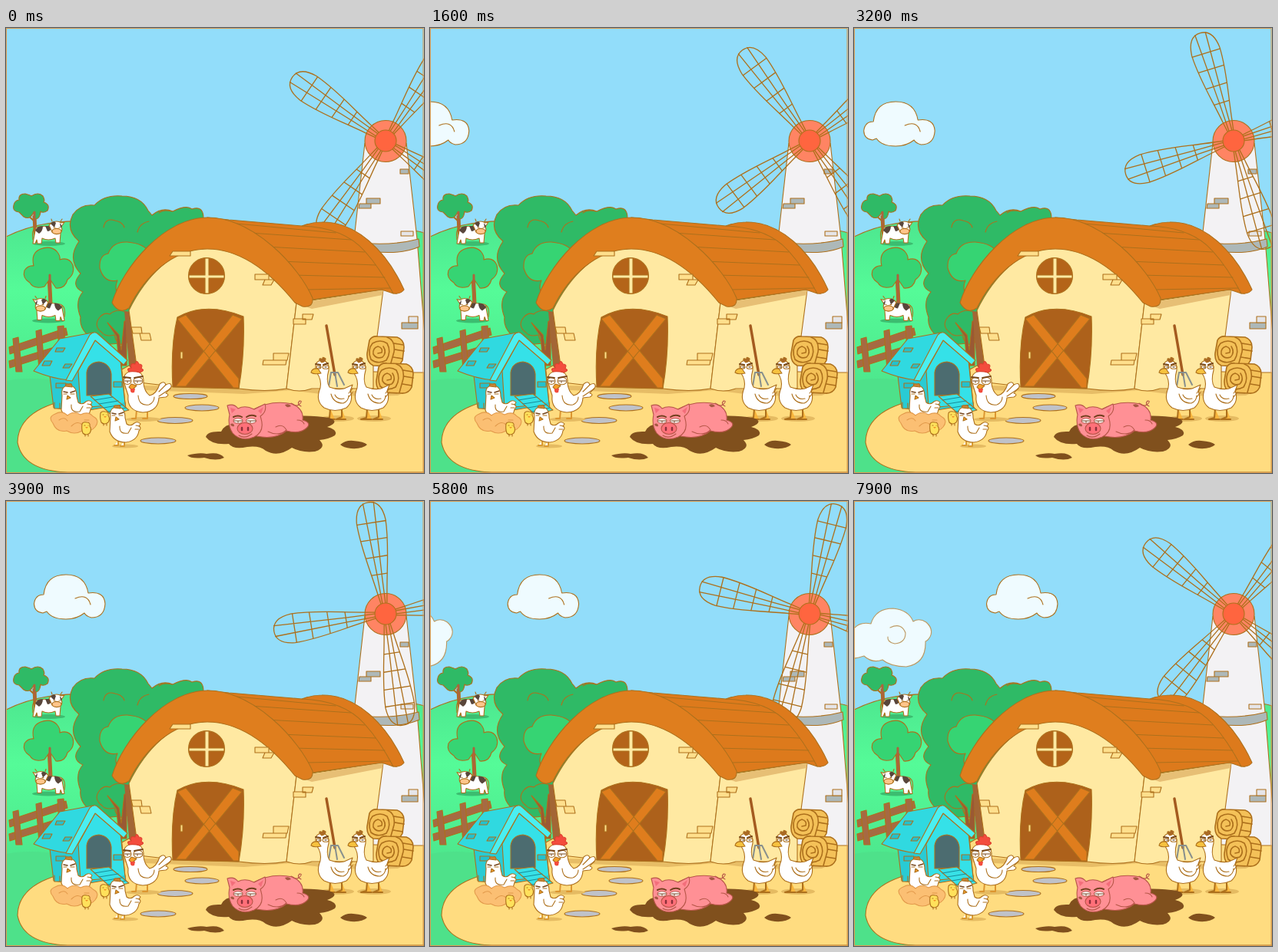
An HTML page that plays this animation: 544x580 px, repeating every 8000 ms.

```html
<!DOCTYPE html>
<html lang="en">
<head>
<meta charset="utf-8">
<title>Farm</title>
<style>
html, body { margin: 0; width: 100%; height: 100%; overflow: hidden; background: #92ddfa; }
svg { display: block; width: 544px; height: 580px; }
.ink { stroke: #ad701c; stroke-width: 1.1; stroke-linejoin: round; stroke-linecap: round; }
.line { fill: none; }
.flat { stroke: none; }
</style>
</head>
<body>
<svg viewBox="0 0 544 580">
<defs>
  <linearGradient id="grass" x1="0" y1="250" x2="0" y2="560" gradientUnits="userSpaceOnUse">
    <stop offset="0" stop-color="#4de68f"/><stop offset=".3" stop-color="#55fb98"/><stop offset=".8" stop-color="#4be28a"/>
  </linearGradient>
  <g id="blade" fill="none" stroke-width="1.3">
    <path d="M14 -4L26 -6C60 -11 90 -19 122 -19Q147 -17 147 0Q147 17 122 19C90 19 60 11 26 6L14 4"/>
    <path d="M14 -2L50 -3L146 -7M14 2L50 3L146 7M52 -10V10M75 -14V14M98 -17V17M120 -19V19"/>
  </g>
  <g id="cow" fill="#fff">
    <ellipse cx="56" cy="281" rx="21" ry="3" fill="#3cbd70" class="flat"/>
    <path d="M38 261Q33 264 35 276" class="line"/>
    <path d="M39 260Q52 256 66 261L71 268L70 280H65L64 274Q55 278 47 274L46 281H41L40 276L38 281H35Q37 268 39 260Z"/>
    <path d="M38 264Q40 258 48 258Q48 265 43 268ZM51 258H58Q60 265 54 265Z" fill="#59463b" class="flat"/>
    <path d="M59 254Q66 250 72 254L76 253L72 259Q74 264 71 267Q65 270 60 266Q58 261 56 257Z"/>
    <path d="M58 255Q62 250 65 254L63 260ZM70 254L73 258L71 261Z" fill="#59463b" class="flat"/>
    <ellipse cx="66" cy="265" rx="6" ry="3.600" fill="#ffc58a"/>
    <path d="M62 260H64M69 260H70M60 252L59 249M71 252L73 249" class="line"/>
  </g>
  <g id="goose" fill="#fff">
    <ellipse cx="431" cy="509" rx="22" ry="4" fill="#e5bb62" class="flat"/>
    <path d="M422 496L421 508L414 510H428M437 496V507L430 510H442" fill="#f8b53d" stroke-width="2"/>
    <path d="M403 443Q402 434 411 433Q421 434 420 446Q416 460 421 468Q431 472 440 470L451 465L448 473Q453 486 443 495Q428 502 414 495Q402 486 409 469Q411 459 405 450Z"/>
    <path d="M451 470L446 476M451 475L446 481M423 477Q426 489 439 489Q446 486 446 479M428 478Q431 485 440 483" class="line"/>
    <path d="M406 444Q398 443 397 449Q401 452 410 450Z" fill="#f6c23f"/>
    <path d="M408 433Q407 429 412 432Q411 427 416 431Q416 435 411 436Z" fill="#a96827"/>
    <path d="M403 438L409 439M413 439L419 437" stroke="#764514" stroke-width="2"/>
    <ellipse cx="407" cy="442" rx="3" ry="2"/><ellipse cx="416" cy="442" rx="4" ry="2.300"/>
    <path d="M407 442H409M415 442H417" stroke="#513314"/>
  </g>
  <g id="hen" fill="#fff">
    <path d="M146 538V544H141M154 538V545H149" stroke="#d99a31" stroke-width="2"/>
    <path d="M136 507Q134 494 145 494Q155 494 155 508L157 516Q162 520 167 515Q172 512 175 516L173 519Q177 521 173 525Q171 538 156 540Q140 540 135 526Z"/>
    <path d="M141 495Q139 491 145 492Q149 490 149 496Z" fill="#c78338"/>
    <path d="M138 502L143 503M147 503L153 501" stroke="#75451b" stroke-width="1.500"/>
    <path d="M138 505H142M147 505H152M148 519Q147 530 159 528L163 521M169 518L174 519M168 523H173" class="line"/>
    <path d="M143 507L147 510L142 512Z" fill="#f5a02d"/>
  </g>
  <g id="chick">
    <path d="M99 516Q100 513 105 514Q110 514 109 519Q112 523 109 528Q104 532 100 528Q98 523 99 516Z" fill="#ffe15b"/>
    <path d="M102 518H103M107 518H107M103 530V532M107 530V532" class="line"/><path d="M103 520H107L105 522Z" fill="#f08f25" class="flat"/>
  </g>
  <g id="bale" stroke-width="1.600">
    <path d="M485 442Q488 436 496 437L521 438Q530 441 530 451L528 468Q524 477 514 476L490 475Q481 471 482 459Z" fill="#f4c158"/>
    <path d="M508 438Q519 442 517 457L512 475M517 446L529 448M518 454L530 456M516 464L528 466" class="line"/>
    <path class="line" d="M508 446Q514 457 507 468Q496 474 487 467Q482 454 489 446Q499 440 508 446M503 450Q508 458 502 464Q494 467 490 460Q489 452 496 450Q503 452 501 458L496 459"/>
  </g>
</defs>

<g class="ink">
  <path class="flat" d="M0 0H544V580H0Z" fill="#92ddfa"/>
  <g id="cloudA" fill="#effbff">
    <path d="M48 146Q37 145 36.500 134Q38 122 49 122Q52 96 78 96Q103 96 107 120Q128 117 129 134Q128 152 111 152Q104 150 102 146Q92 154 78 154Q60 154 53 144Z"/>
    <path class="line" d="M90 127Q106 120 110 135"/>
  </g>
  <g id="cloudB" fill="#effbff" stroke="#bd9860">
    <path d="M22 160Q28 140 51 140Q71 142 77 157Q85 152 94 158Q104 167 99 177Q96 182 93 183Q94 212 68 216Q48 216 37 207Q24 212 13 202Q-14 211 -26 197Q-36 184 -23 173Q-14 162 0 166Q8 157 22 160Z"/>
    <path class="line" d="M47 165Q62 158 67 172Q67 185 53 186Q43 184 44 177"/>
  </g>

  <path d="M0 272Q45 250 100 252Q280 260 380 300L470 276Q520 258 544 267V580H0Z" fill="url(#grass)"/>
  <path d="M0 460Q28 454 70 460V580H0Z" fill="#4ee18a" class="flat"/>

  <path d="M467 150L453 275L440 450H546L545 400L535 275L521 150Z" fill="#f3f2f4"/>
  <g fill="#adb8b8">
    <path d="M452 279Q499 285 537 275L538 285Q514 296 475 291L452 288Z"/>
    <path d="M469 222H487V229H469ZM460 229H475V235H459ZM513 184H524V190H513ZM515 384H536V392H515Z"/>
    <path fill="#e5e5e8" d="M514 265H530V271H514ZM524 376H536V384H524Z"/>
  </g>
  <circle cx="494" cy="147.500" r="27" fill="#ff8463"/>
  <g id="sails"></g>
  <circle cx="494" cy="147" r="14" fill="#ff653f"/>

  <g fill="#ad633d">
    <path d="M35 245L37 280H40L39 246ZM54 320L56 360H60L58 320Z"/>
    <path d="M37 252L26 242M38 247L47 237M57 333L45 322M58 328L68 319" class="line" stroke-width="2"/>
  </g>
  <path fill="#2fba66" d="M17 240Q8 239 10 231Q11 225 17 224Q16 216 25 216Q32 218 33 219Q42 213 48 219Q51 224 49 227Q58 230 54 238Q48 242 45 239Q44 250 37 249L36 240Q31 251 23 246Z"/>
  <path fill="#36d473" d="M31 332Q21 326 24 316Q29 309 36 310Q32 293 45 288Q58 283 66 291Q71 297 70 302Q82 298 87 309Q90 321 80 328Q77 340 65 339L57 327L50 337Q36 341 31 332Z"/>
  <path d="M37 240V252M57 322V338" class="line" stroke-width="3" stroke="#ad633d"/>
  <use href="#cow"/>
  <use href="#cow" transform="matrix(-1 0 0 1 111 100.500)"/>

  <path d="M126 413Q94 398 97 377Q89 356 100 344Q83 336 97 320Q79 301 95 278Q77 263 87 243Q97 229 115 231Q128 217 151 219Q176 219 185 238L190 244Q203 233 217 239Q235 230 242 236Q257 231 257 248L230 310L158 410Z" fill="#2fba66"/>
  <path d="M127 260Q129 247 142 251Q152 253 154 260M171 266Q174 254 186 252M199 241Q205 236 216 239" class="line"/>
  <path d="M122 313Q121 296 133 294Q139 278 158 279Q181 281 186 293L178 325L151 355Q139 343 145 329Q128 333 122 313Z" fill="#36d473"/>
  <path d="M125 397Q113 388 122 377Q128 370 135 373Q145 364 160 372L158 409Q146 419 141 400Q130 403 125 397Z" fill="#2fba66"/>
  <path d="M132 384L147 400L150 420L154 382H157V440H147L144 402Z" fill="#9a5934"/>

  <g fill="#a66a42">
    <path d="M4 416L78 391L80 400L5 425ZM4 434L76 412L77 420L5 443Z"/>
    <path d="M9 405L16 403L21 448H13ZM39 395L46 393L50 445H43ZM67 389L75 388L79 435H70Z"/>
  </g>

  <path d="M75 486Q16 500 15 540Q22 577 80 579H544V449H520L160 440Z" fill="#ffdc80"/>
  <path class="flat" d="M147 452L177 466L365 470L491 474L520 474L510 479Q430 482 372 472L310 477L155 471Z" fill="#e7bd66"/>

  <path class="flat" d="M154 369L163 370L174 462L160 440Z" fill="#a36635"/>
  <path d="M160 368C181 325 217 286 261 286C310 287 351 325 378 358L365 470Q339 475 303 470L216 467L173 462Z" fill="#ffe9a2"/>
  <path d="M378 358L491 341L478 440V470H398Q382 476 365 470Z" fill="#ffe9a2"/>
  <path class="flat" d="M378 359L491 341L490 348L398 366Z" fill="#e7bf75"/>
  <path d="M262 247L290 250L385 258Q398 253 411 253C455 252 495 290 518 341Q514 347 504 346L489 341L399 354Z" fill="#dd7a1c"/>
  <path d="M385 258Q440 260 467 291Q486 312 504 346" class="line"/>
  <path d="M300 255L429 267M317 267L449 276M338 285L467 292M356 304L481 309M373 322L493 325M390 341L500 339" class="line"/>
  <path d="M138 358C152 312 206 247 262 247C323 247 382 312 399 352Q400 365 386 363L376 358C347 322 308 288 262 288C218 288 181 322 160 365Q147 374 138 358Z" fill="#df7e1e"/>
  <path fill="#ffdf8c" d="M217 291H240V297H213ZM324 321H342V328H324ZM337 328H349L345 335H334ZM163 390H176L177 398H165ZM174 398H187L189 407H176ZM348 424H368L366 433H348ZM335 433H365L364 439H334ZM386 373H400L398 380H386ZM374 379H390V386H374Z"/>
  <circle cx="261" cy="323" r="23.500" fill="#b46419"/>
  <path d="M259 300H264V322H284V326H264V346H259V326H238V322H259Z" fill="#ffe9a2"/>

  <path d="M217 468Q214 414 223 377Q260 356 309 376Q311 424 303 470Z" fill="#ad611b"/>
  <path d="M295 374L307 379L234 467H221ZM223 379L234 374L303 457V469H296Z" fill="#df7d1d"/>
  <path d="M227 422H230V431H227Z" fill="#ffdf8c"/>

  <path d="M417 388L428 452" class="line" stroke-width="3.500" stroke="#a45b20"/>
  <path d="M420 467L423 449H432L440 465M428 449L431 467" class="line" stroke="#88908d" stroke-width="2"/>
  <use href="#bale" transform="translate(-12 -35)"/>
  <use href="#bale"/>

  <g fill="#bfc2c9">
    <ellipse cx="240" cy="480" rx="22" ry="3.500"/><ellipse cx="255" cy="495" rx="22" ry="4"/>
    <ellipse cx="220" cy="511.500" rx="23" ry="4"/><ellipse cx="198" cy="538" rx="23" ry="4"/>
  </g>

  <path d="M57 453L96 447L150 437L155 490L97 500L62 495Z" fill="#29cbd4"/>
  <path d="M94 447L116 407L149 434L155 490L97 495Z" fill="#35e1e8"/>
  <path d="M63 488V496H70V489M149 489L151 496H156L155 488M94 493L95 502H101V492" fill="#29cbd4"/>
  <path d="M36 447L70 405L113 397L119 402L82 459Q60 457 36 447Z" fill="#30d9e0"/>
  <path d="M78 459L109 400Q115 394 120 399L158 433L153 439L116 407L86 460Z" fill="#4aeff1"/>
  <path d="M50 434H60L57 440H47ZM66 417H77L74 422H64ZM77 438H86L82 443H74ZM65 463H78V469H65ZM140 461H151V468H140Z" fill="#22c2cf"/>
  <path d="M105 479V449Q107 436 121 435Q135 437 137 451V478Z" fill="#4c6c70"/>
  <path d="M110 480L134 477L160 498L137 504Z" fill="#38e1e7"/>
  <path d="M115 485L139 481M121 490L146 486M127 495L151 491M133 500L156 495" class="line" stroke="#178d9a"/>

  <g fill="#fff">
    <ellipse cx="179" cy="510" rx="23" ry="3" fill="#e5bb62" class="flat"/>
    <path d="M170 498L169 509H164M184 498V509H178" stroke="#dc9630" stroke-width="2" class="line"/>
    <path d="M153 460Q153 447 167 447Q180 448 179 463Q180 474 187 479Q196 477 200 464Q206 459 208 465Q216 461 215 468L208 476Q214 478 208 481L199 482Q198 500 178 501Q157 499 159 479Z"/>
    <path d="M199 474L208 465M199 480L214 470M172 479Q173 493 186 491Q193 488 193 481" class="line"/>
    <path d="M160 448Q156 443 163 443Q161 436 168 438Q170 431 173 438Q179 438 176 444Q182 446 174 449Q167 447 160 448Z" fill="#f34c3d" stroke="#dc402e"/>
    <ellipse cx="158" cy="460" rx="5" ry="4.500"/><ellipse cx="172" cy="460" rx="6" ry="4.800"/>
    <path d="M153 455L162 456M167 456L178 454" stroke="#774719" stroke-width="1.800"/>
    <path d="M154 460H162M167 460H177M158 461V462M171 461V462" stroke="#774719"/>
    <path d="M163 464L170 466L164 472L160 468Z" fill="#f5a02d"/><path d="M162 470Q161 477 167 475L168 470Z" fill="#f34c3d" class="flat"/>
  </g>

  <use href="#hen" transform="translate(-63 -28)"/>
  <path d="M61 515Q54 507 64 503Q73 498 80 505Q88 498 97 504Q107 499 113 506Q123 511 116 520Q109 528 99 525Q89 531 79 525Q66 528 61 515Z" fill="#fbbf73" stroke="#e29a4b"/>
  <path d="M69 511Q76 506 80 512M85 519Q93 511 99 517M102 511H108" class="line" stroke="#e29a4b"/>
  <use href="#chick" transform="translate(24 -14)"/>
  <use href="#chick"/>
  <ellipse class="flat" cx="155" cy="545" rx="17" ry="2.500" fill="#e5bb62"/>
  <use href="#hen"/>
  <use href="#goose"/>
  <use href="#goose" transform="translate(48)"/>

  <g fill="#80501d" class="flat">
    <path d="M260 533Q262 525 280 526Q285 515 300 516L350 508Q392 503 420 508Q436 513 418 520Q433 524 428 531Q420 536 408 537Q418 547 402 552Q385 554 372 547Q354 560 338 551Q330 544 314 546Q296 550 290 542Q268 544 260 533Z"/>
    <path d="M435 543Q442 537 452 538Q466 539 470 543Q464 549 449 548Q439 547 435 543ZM236 557Q251 553 261 555Q278 552 284 560Q274 565 258 560Q241 562 236 557Z"/>
  </g>

  <g fill="#ff9095" stroke="#b65648">
    <path d="M320 498Q345 484 373 490Q388 497 386 511Q400 515 389 523Q381 529 365 525Q351 537 326 532Z"/>
    <path d="M371 489Q377 494 381 491Q387 486 382 486Q378 490 384 493" class="line"/>
    <path d="M291 504L288 492Q297 489 302 496Q311 491 323 497L337 490Q340 500 331 506Q338 526 323 533Q306 540 295 528Q288 518 291 504Z"/>
    <path class="line" d="M341 526Q355 533 365 524Q360 515 351 520M379 511Q386 511 388 516"/>
    <path d="M292 495L299 497L294 502ZM328 499L335 494L332 503Z" fill="#f36e7b" class="flat"/>
    <ellipse cx="311" cy="522" rx="10" ry="7.500" fill="#ff7079"/>
    <path d="M307 521V524M315 521V524" stroke="#8c303b" stroke-width="2.500"/>
    <path class="line" d="M303 531Q311 536 320 529"/>
    <ellipse cx="302" cy="512" rx="6" ry="3.300" fill="#fff"/><ellipse cx="319" cy="512" rx="6.500" ry="3.300" fill="#fff"/>
    <path d="M296 507Q302 504 307 507M313 507Q319 503 325 506" class="line" stroke="#73401f" stroke-width="2"/>
    <path d="M297 512H307M314 512H325M302 513V514M318 513V514" stroke="#73401f"/>
    <path class="flat" fill="#a75843" d="M363 491Q369 489 371 493Q365 496 363 491ZM292 516Q297 514 297 519Q293 520 292 516Z"/>
  </g>
  <path d="M.5 .5H543V579.500H.5Z" class="line" stroke="#d99c53"/>
</g>
</svg>
<script>
const LOOP = 8000, STEP = 100;
const CLOUD_SPEED = 34, TURN_SPEED = 12;
const byId = id => document.getElementById(id);
const sails = byId("sails"), cloudA = byId("cloudA"), cloudB = byId("cloudB");

sails.innerHTML = [0, 90, 180, 270]
  .map(angle => `<use href="#blade" transform="rotate(${angle})"/>`).join("");

function shift(cloud, seconds) {
  cloud.setAttribute("transform", `translate(${CLOUD_SPEED * seconds})`);
}

function draw(now) {
  const t = Math.floor((now % LOOP) / STEP) * STEP / 1000;
  sails.setAttribute("transform", `translate(494 147) rotate(${214.3 + TURN_SPEED * t})`);
  shift(cloudA, t - 3.9);
  shift(cloudB, t - 7.9);
}

const start = performance.now();
function tick() {
  draw(performance.now() - start);
  requestAnimationFrame(tick);
}
tick();
</script>
</body>
</html>
```
